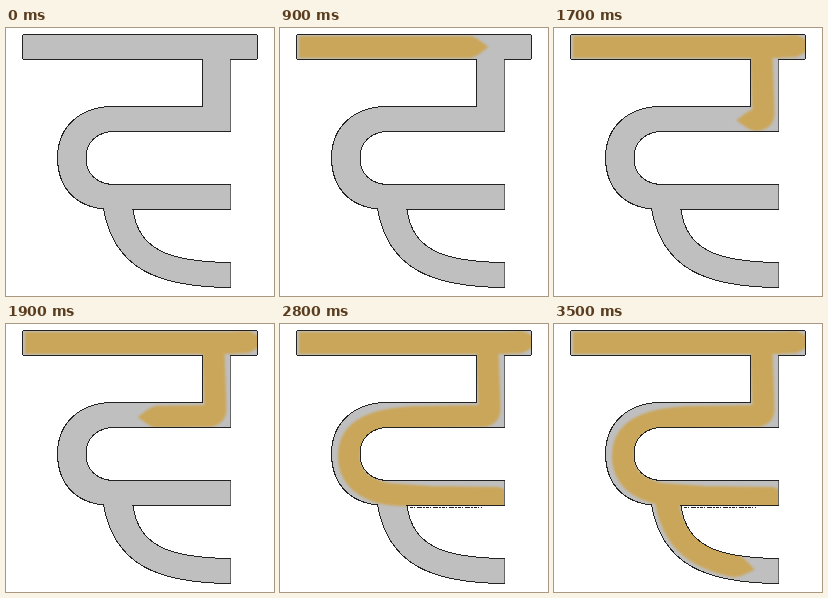
Write an HTML page without scripts that moves like this. It is 268x268 px and loops after 3.6 s.

```html
<!DOCTYPE html>
<html lang="hi">
<head>
<meta charset="utf-8">
<title>Letter stroke order</title>
<style>
@property --d { syntax: "<length>"; inherits: true; initial-value: 0px; }
html, body { margin: 0; width: 100%; height: 100%; overflow: hidden; background: #fff; }
svg { display: block; width: 100vw; height: 100vh; }

.body { fill: #bfbfbf; }
.line { fill: none; stroke: #222; stroke-width: 1; shape-rendering: crispEdges; }
.edge { stroke: #666; }
.ink { filter: url(#soft); }

/* --d is how far the brush has travelled along --p */
.stroke { --ink: #caa65a; animation: 3.6s infinite; }
.stroke .trail {
  d: var(--p);
  fill: none;
  stroke: var(--ink);
  stroke-width: var(--w);
  stroke-dasharray: 600px;
  stroke-dashoffset: calc(600px - var(--d));
}
.stroke .tip { fill: var(--ink); offset-path: var(--p); offset-distance: var(--d); offset-rotate: auto; }

.bar  { --w: 22px; --p: path("M19 19H222L242 18"); animation-name: bar; }
.hook { --w: 22px; --p: path("M207 13L209.5 84Q210 92 202 92L140 93C96 94 69 104 69 132C69 155 86 166 108 170L150 173L219 174"); animation-name: hook; }
.tail { --w: 23px; --p: path("M111 166C116 220 144 243 226 247"); animation-name: tail; }

@keyframes bar {
  0% { --d: 0px; opacity: 0; animation-timing-function: step-end; }
  2.77% { --d: 2px; opacity: 1; animation-timing-function: steps(9); }
  27.77% { --d: 193px; opacity: 1; animation-timing-function: step-end; }
  30.55%, 100% { --d: 224px; opacity: 1; }
}
@keyframes hook {
  0% { --d: 0px; opacity: 0; animation-timing-function: step-end; }
  36.1% { --d: 0px; opacity: 1; animation-timing-function: step-end; }
  38.88% { --d: 10px; opacity: 1; animation-timing-function: steps(5); }
  52.77% { --d: 136px; opacity: 1; animation-timing-function: steps(9); }
  77.77%, 100% { --d: 425px; opacity: 1; }
}
@keyframes tail {
  0% { --d: 0px; opacity: 0; animation-timing-function: step-end; }
  86.1% { --d: 0px; opacity: 1; animation-timing-function: steps(4); }
  97.22%, 100% { --d: 115px; opacity: 1; }
}

.specks { stroke-dasharray: 3 1 1 2 5 1 2 1; animation: specks 3.6s step-end infinite; }
@keyframes specks {
  0% { opacity: 0; }
  74.99%, 100% { opacity: 1; }
}
</style>
</head>
<body>
<svg viewBox="0 0 268 268">
  <defs>
    <path id="letter" d="M17.5 6.5H250.5L251.5 7.5V30.5L250.5 31.5H224.5V103.5H109C91 103.5 80 114 80 130C80 146 91 156.5 109 156.5H224.5V181.5H127C132 220 160 234 224.5 234.5V259.5C150 259 108 240 97.500 181C68 178 51.500 158 51.500 130C51.500 98 75 78.500 107 78.500H196.500V31.500H17.500L16.500 30.500V7.500Z"/>
    <path id="point" d="M-1-11C6-10 12-4 18 0C12 4 6 10-1 11Z"/>
    <clipPath id="inside"><use href="#letter"/></clipPath>
    <filter id="soft" filterUnits="userSpaceOnUse" x="-20" y="-20" width="320" height="320" color-interpolation-filters="sRGB">
      <feGaussianBlur stdDeviation="1.2"/>
    </filter>
  </defs>
  <use href="#letter" class="body"/>
  <g clip-path="url(#inside)">
    <g class="ink">
      <g class="stroke bar"><path class="trail"/><use href="#point" class="tip"/></g>
      <g class="stroke hook"><path class="trail"/><use href="#point" class="tip"/></g>
      <g class="stroke tail"><path class="trail"/><use href="#point" class="tip"/></g>
    </g>
  </g>
  <use href="#letter" class="line"/>
  <path class="line edge" d="M224.500 32V103M224.500 157V181M224.500 235V259"/>
  <path class="line specks" d="M130 183.500H202"/>
</svg>
</body>
</html>
```
